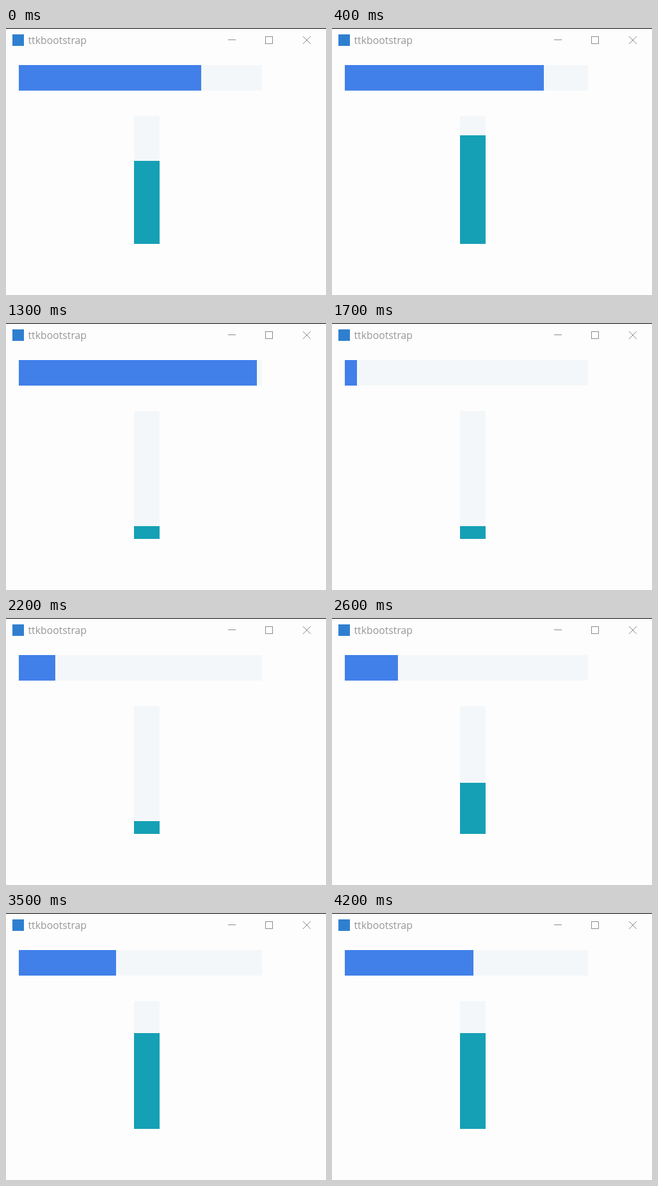
These frames come from a looping animation (500x418 px, 4.3 s). An HTML page:

```html
<!DOCTYPE html>
<html lang="en">
<head>
<meta charset="utf-8">
<title>ttkbootstrap</title>
<style>
  html, body { margin: 0; width: 100%; height: 100%; overflow: hidden; background: #fdfdfd; }
  svg { display: block; width: 500px; height: 418px; }
  text { font: 15.8px "Open Sans", "Noto Sans", sans-serif; fill: #979797; }
  .ctl { fill: none; stroke: #8c8c8c; }
</style>
</head>
<body>
<svg viewBox="0 0 500 418">
  <rect width="500" height="418" fill="#fdfdfd"/>
  <rect width="500" height="1" fill="#000"/>
  <rect x="10" y="10" width="18" height="18" fill="#2f7fd0"/>
  <text x="34.5" y="25">ttkbootstrap</text>
  <g class="ctl">
    <path d="M347 18.5H359" shape-rendering="crispEdges"/>
    <rect x="405.5" y="13.5" width="11" height="11" shape-rendering="crispEdges"/>
    <path d="M464 13L476 25M476 13L464 25"/>
  </g>
  <g shape-rendering="crispEdges">
    <rect x="20" y="58" width="380" height="40" fill="#f4f7f9"/>
    <rect id="hbar" x="20" y="58" height="40" fill="#4180e9"/>
    <rect x="200" y="138" width="40" height="200" fill="#f4f7f9"/>
    <rect id="vbar" x="200" width="40" fill="#15a0b5"/>
  </g>
</svg>
<script>
const LOOP = 4300, TICK = 100;
const hbar = document.getElementById("hbar");
const vbar = document.getElementById("vbar");

// Steady fill that wraps after 98 percent.
function hPercent(n) {
  return n < 14 ? Math.floor(75.3 + 1.75 * n)
                : Math.max(0, Math.round(5 + 1.92 * (n - 17)));
}

// One jump per second; each jump is 5 percent larger than the last.
function vPercent(n) {
  const jumps = Math.floor((n + 7) / 10);
  let value = 65;
  for (let i = 0; i < jumps; i++) value = (value + 20 + 5 * i) % 100;
  return value;
}

function draw(ms) {
  const n = Math.floor((ms % LOOP) / TICK);
  const height = vPercent(n) * 2;
  hbar.setAttribute("width", Math.floor(hPercent(n) * 3.8 + 1e-6));
  vbar.setAttribute("y", 338 - height);
  vbar.setAttribute("height", height);
}

let start = null;
function frame() {
  const now = performance.now();
  if (start === null) start = now;
  draw(now - start);
  requestAnimationFrame(frame);
}
draw(0);
requestAnimationFrame(frame);
</script>
</body>
</html>
```
